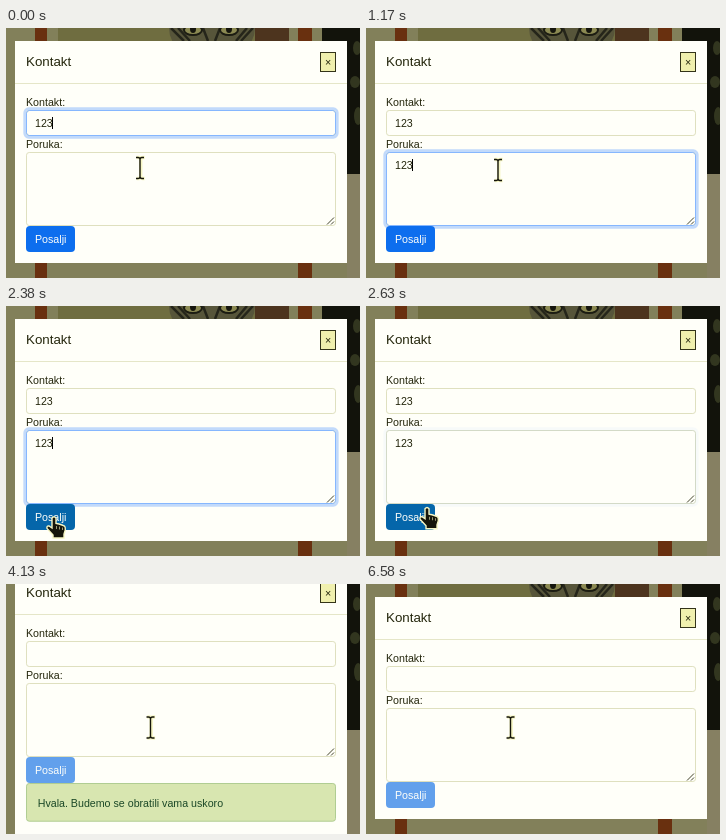
An HTML page for the animation above (6620 ms loop, 354 px wide and 250 px high).

```html
<!DOCTYPE html>
<html lang="sr-Latn">
<head>
<meta charset="utf-8">
<title>Kontakt</title>
<style>
  html, body { margin: 0; width: 100%; height: 100%; overflow: hidden; }
  svg { display: block; width: 100vw; height: 100vh; }
  text { font: 10.667px "Liberation Sans", Arial, sans-serif; fill: #24260c; white-space: pre; }
  .title { font-size: 13.333px; }
  .field { fill: #fffff9; stroke: #dfe0bf; }
  .glow { fill: none; stroke: #0d6efd; stroke-opacity: .25; stroke-width: 2.7; }
  .edge { fill: none; stroke: #86b7fe; }
  .caret { fill: #000; }
  .halo { fill: none; stroke: #f6f6c4; stroke-width: 3.4; stroke-linejoin: round; }
  .ink { fill: none; stroke: #15150a; stroke-width: 1.4; }
</style>
</head>
<body>
<svg viewBox="0 0 354 250" preserveAspectRatio="none">
  <defs>
    <clipPath id="photo"><rect x="52" width="231" height="146"/></clipPath>
    <clipPath id="alertClip"><rect id="alertWindow" x="20" y="223.5" width="310" height="38.7"/></clipPath>
    <path id="beam" d="M-4 -10.5H-2Q0 -10.5 0 -8.5Q0 -10.5 2 -10.5H4M0 -8.5V8.5M-4 10.5H-2Q0 10.5 0 8.5Q0 10.5 2 10.5H4"/>
    <path id="glove" d="M-2 0Q0 -2.500 2 0V5.500L5 6L8 7L10.500 8Q11.500 9 11.300 12L10 16V20H-1V17L-7 10.500Q-7.500 7.500 -5 8L-2 10Z"/>
  </defs>

  <!-- dimmed page -->
  <rect width="354" height="250" fill="#82805a"/>
  <rect x="29" width="12" height="250" fill="#69300f"/>
  <rect x="292" width="14" height="250" fill="#69300f"/>
  <g clip-path="url(#photo)">
    <rect x="52" width="231" height="146" fill="#6f6d40"/>
    <rect x="249" width="34" height="146" fill="#4d341e"/>
    <ellipse cx="206" cy="0" rx="43" ry="34" fill="#57553a"/>
    <path d="M165 0L178 13M172 0L184 13M247 0L235 13M241 0L230 13M197 0L202 13M214 0L209 13" stroke="#25251a" stroke-width="2.500"/>
    <ellipse cx="187" cy="2" rx="9" ry="5" fill="#8b8952" stroke="#1c1c12" stroke-width="2"/>
    <ellipse cx="223" cy="2" rx="9" ry="5" fill="#8b8952" stroke="#1c1c12" stroke-width="2"/>
    <ellipse cx="187" cy="1" rx="3" ry="4" fill="#15150d"/>
    <ellipse cx="223" cy="1" rx="3" ry="4" fill="#15150d"/>
  </g>
  <rect x="316" width="38" height="146" fill="#12130b"/>
  <g fill="#32361f">
    <ellipse cx="351" cy="20" rx="4" ry="7"/>
    <ellipse cx="349" cy="54" rx="5" ry="6"/>
    <ellipse cx="352" cy="88" rx="4" ry="9"/>
  </g>
  <rect x="341" y="146" width="13" height="104" fill="#868062"/>

  <g id="modal">
    <rect id="panel" x="9" y="13" width="332" fill="#fffff9"/>
    <text class="title" x="20" y="38.300">Kontakt</text>
    <rect x="314.500" y="24.500" width="15" height="19" fill="#f0f0ae" stroke="#34341a"/>
    <text x="322" y="37.700" text-anchor="middle">×</text>
    <rect x="9" y="55" width="332" height="1" fill="#e5e6c8"/>

    <text x="20" y="78">Kontakt:</text>
    <rect class="field" x="20.500" y="82.500" width="309" height="25" rx="2.700"/>
    <g id="contactFocus">
      <rect class="glow" x="18.700" y="80.700" width="312.600" height="28.600" rx="4"/>
      <rect class="edge" x="20.500" y="82.500" width="309" height="25" rx="2.700"/>
    </g>
    <text id="contactText" x="29" y="99">123</text>
    <rect id="contactCaret" class="caret" x="46" y="89" width="1" height="12"/>

    <text x="20" y="120">Poruka:</text>
    <rect class="field" x="20.500" y="124.500" width="309" height="73" rx="2.700"/>
    <g id="messageFocus">
      <rect class="glow" x="18.700" y="122.700" width="312.600" height="76.600" rx="4"/>
      <rect class="edge" x="20.500" y="124.500" width="309" height="73" rx="2.700"/>
    </g>
    <path d="M321 196.500l7 -7M325 196.500l3 -3" stroke="#44442c"/>
    <text id="messageText" x="29" y="141"></text>
    <rect id="messageCaret" class="caret" y="131" width="1" height="12"/>

    <rect id="button" x="20" y="198" width="49" height="26" rx="4"/>
    <text x="29" y="214.800" style="fill:#fffffa">Posalji</text>

    <g id="alert">
      <rect id="alertBox" x="20.500" y="224.500" width="309" rx="2.700" fill="#d8e6b0" stroke="#b0cd92"/>
      <g clip-path="url(#alertClip)">
        <text id="alertText" x="31.700" style="fill:#1b4827">Hvala. Budemo se obratili vama uskoro</text>
      </g>
    </g>
  </g>

  <g id="pointer">
    <g id="beamCursor"><use href="#beam" class="halo" x=".7"/><use href="#beam" class="ink"/></g>
    <g id="handCursor">
      <use href="#glove" fill="#15150a" stroke="#f6f6c4" stroke-width="1.400"/>
      <path d="M2.500 8V11M5.500 8.500V11.500M8.500 9.500V12" stroke="#d8d8a8" stroke-width=".7"/>
    </g>
  </g>
</svg>
<script>
  const LOOP = 6620, BLINK = 600, DIGIT = 5.93;
  const KEYS = [420, 520, 605];
  const SWITCH = 200, CLICK = 2500, SENT = 2960, CLOSE = 6070, SLIDE = 500;
  const PANEL_HEIGHT = 222, ALERT_HEIGHT = 38.7, ALERT_MARGIN = 10.7;
  const PATH = [[0, 134, 140], [SWITCH, 132, 142], [1760, 132, 142], [1830, 129, 148],
    [2330, 48, 212], [2540, 48, 212], [2920, 144.5, 143.5]];

  const el = Object.fromEntries([...document.querySelectorAll('[id]')].map(e => [e.id, e]));
  const set = (name, attr, value) => el[name].setAttribute(attr, value);
  const show = (name, on) => set(name, 'visibility', on ? 'visible' : 'hidden');
  const ramp = (t, start, span) => Math.min(1, Math.max(0, (t - start) / span));
  const swing = p => 0.5 - Math.cos(Math.PI * p) / 2;

  function pointerAt(t) {
    const next = PATH.findIndex(p => p[0] > t);
    if (next < 0) return PATH[PATH.length - 1].slice(1);
    const [a, b] = [PATH[next - 1], PATH[next]];
    const p = swing(ramp(t, a[0], b[0] - a[0]));
    return [a[1] + (b[1] - a[1]) * p, a[2] + (b[2] - a[2]) * p];
  }

  function render(t) {
    const sent = t >= SENT;
    const typed = KEYS.filter(k => t >= k);
    const lastKey = typed.length ? typed[typed.length - 1] : SWITCH;
    const blinkOn = (t - lastKey) % (2 * BLINK) < BLINK;

    el.contactText.textContent = sent ? '' : '123';
    el.messageText.textContent = sent ? '' : '123'.slice(0, typed.length);
    show('contactCaret', t < SWITCH);
    show('messageCaret', t >= SWITCH && t < CLICK && blinkOn);
    set('messageCaret', 'x', Math.floor(29 + typed.length * DIGIT));
    set('contactFocus', 'opacity', 1 - ramp(t, SWITCH, 150));
    set('messageFocus', 'opacity', ramp(t, SWITCH, 150) * (1 - ramp(t, CLICK, 150)));

    const [x, y] = pointerAt(t);
    const hover = x >= 20 && x <= 69 && y >= 198 && y <= 224;
    set('pointer', 'transform', `translate(${x} ${y})`);
    show('handCursor', hover);
    show('beamCursor', !hover);
    set('button', 'fill', sent ? '#62a0ec' : hover ? '#0566aa' : '#0d6eee');

    // The centred dialog moves up by half of what the alert adds.
    const open = sent ? 1 - swing(ramp(t, CLOSE, SLIDE)) : 0;
    const added = (ALERT_HEIGHT + ALERT_MARGIN) * open;
    set('modal', 'transform', `translate(0 ${-Math.round(added / 2)})`);
    set('panel', 'height', PANEL_HEIGHT + added);
    show('alert', open > 0);
    set('alertBox', 'height', Math.max(0, ALERT_HEIGHT * open - 1));
    set('alertWindow', 'height', ALERT_HEIGHT * open);
    set('alertText', 'y', 237.3 + 10.7 * open);
  }

  function tick() {
    render(performance.now() % LOOP);
    requestAnimationFrame(tick);
  }
  tick();
</script>
</body>
</html>
```
